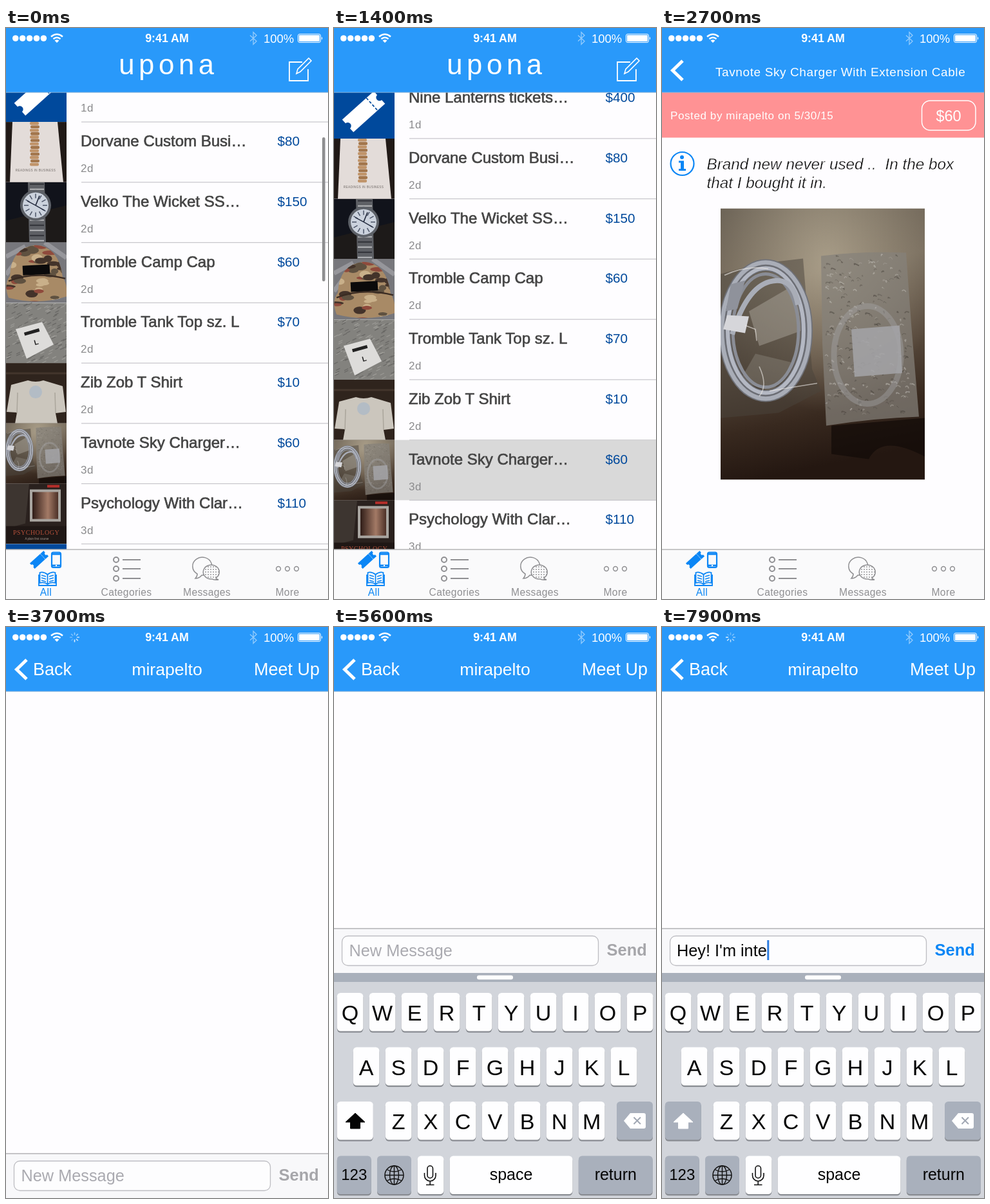
Animation of 500 by 888 pixels, one loop 8000 ms. Source, as an HTML page:

```html
<!DOCTYPE html>
<html lang="en">
<head>
<meta charset="utf-8">
<title>Marketplace app</title>
<style>
html, body { margin: 0; width: 100%; height: 100%; overflow: hidden; background: #fefdff; }
svg { display: block; width: 100vw; height: 100vh; }
text { font-family: "Liberation Sans", Arial, sans-serif; white-space: pre; }
.logo { font-family: "Liberation Mono", "Courier New", monospace; }
.serif { font-family: "Liberation Serif", serif; }
.medium { stroke: #444; stroke-width: .65; }
.light { font-style: italic; stroke: #fefdff; stroke-width: .5; }
</style>
</head>
<body>
<svg id="stage" viewBox="0 0 500 888" preserveAspectRatio="none"></svg>
<script>
const LOOP = 8000, ROW = 93.75, BLUE = '#2999fa', TINT = '#0b86f5', GREY = '#8f8f92';
const USER = 'mirapelto';

let seed = 7;
const rnd = (a = 0, b = 1) => {
  seed = (seed * 16807) % 2147483647;
  return +(a + (b - a) * seed / 2147483647).toFixed(2);
};
const many = (n, fn) => Array.from({ length: n }, (_, i) => fn(i)).join('');
const text = (x, y, size, fill, str, more = '') =>
  `<text x="${x}" y="${y}" font-size="${size}" fill="${fill}" ${more}>${str}</text>`;
const rect = (x, y, w, h, fill, more = '') =>
  `<rect x="${x}" y="${y}" width="${w}" height="${h}" fill="${fill}" ${more}/>`;
const circle = (x, y, r, fill, more = '') => `<circle cx="${x}" cy="${y}" r="${r}" fill="${fill}" ${more}/>`;
const oval = (x, y, rx, ry, more) => `<ellipse cx="${x}" cy="${y}" rx="${rx}" ry="${ry}" ${more}/>`;
const path = (d, more) => `<path d="${d}" ${more}/>`;
const line = (d, color, width, more = '') => path(d, `fill="none" stroke="${color}" stroke-width="${width}" ${more}`);
const group = (id, body, more = '') => `<g id="${id}" ${more}>${body}</g>`;
const MID = 'text-anchor="middle"', BOLD = 'font-weight="bold"';
const spaced = n => `letter-spacing="${n}"`;

const ticket = (x, y, scale, fill, gap) =>
  `<g transform="translate(${x} ${y}) rotate(-42) scale(${scale})">` +
  path('M-38-15H38V-6A6 6 0 0 0 38 6V15H-38V6A6 6 0 0 0-38-6Z', `fill="${fill}"`) +
  line('M20-15V15', gap, 2, 'stroke-dasharray="5 3"') + '</g>';

// Charger photo, 317 x 422
const strand = (rx, ry, color, w) => oval(70, 190, rx, ry, `fill="none" stroke="${color}" stroke-width="${w}"`);
const photo = () =>
  rect(0, 0, 317, 422, 'url(#table)') + rect(0, 0, 317, 422, 'url(#glow)') +
  path('M172 338L317 326V386Q250 350 230 390L172 382Z', 'fill="#120b08" opacity=".7"') +
  path('M0 102L60 86L128 78L142 250L156 284L90 318L0 326Z', 'fill="#4a443d" opacity=".5"') +
  path('M44 160L116 118L126 190L60 214Z', 'fill="#b9b4ab" opacity=".4"') +
  path('M54 226L112 240L80 286L30 268Z', 'fill="#8f897f" opacity=".4"') +
  strand(68, 106, '#6f7178', 10) + strand(68, 106, '#a9adb7', 6.5) +
  strand(59, 97, '#6a6c73', 9) + strand(59, 97, '#b4b8c3', 6) + strand(51, 88, '#8a8d96', 5) +
  line('M18 196Q40 124 76 114T120 150', '#a9adb7', 8) +
  path('M10 166L44 168L38 194L4 188Z', 'fill="#d6d6da"') +
  path('M16 118L38 112L26 156L8 160Z', 'fill="#8f929b"') +
  line('M38 182L54 188L56 206M6 104Q40 88 74 94M60 246Q74 276 60 292M76 284L150 272', '#eeece8', 1.6, 'opacity=".6"') +
  path('M156 74Q220 66 288 69L296 180L308 324Q240 326 164 338L158 210Z', 'fill="#85817a" opacity=".72"') +
  many(260, () => {
    const y = rnd(74, 322), x = rnd(160, 282 + (y - 70) * .08);
    return line(`M${x} ${y}q${rnd(-4, 4)}-4 ${rnd(1, 7)} ${rnd(-2, 2)}`, rnd() < .45 ? '#d4d1cb' : '#3f3a34',
      rnd(.8, 2), `opacity="${rnd(.2, .5)}"`);
  }) +
  oval(228, 228, 52, 76, 'fill="none" stroke="#a5a5a8" stroke-width="9" opacity=".4"') +
  path('M203 188L278 182L282 256L208 262Z', 'fill="#a5a5a8" opacity=".85"');

// Thumbnails, 94 x 94
const thumbs = {
  blank: () => rect(0, 0, 94, 94, '#00499c') + ticket(46, 52, .87, '#fff', '#00499c'),
  book: () => rect(0, 0, 94, 94, '#211a17') + path('M10 0H80L89 94H6Z', 'fill="#e3dcd9"') +
    many(13, i => rect(37 + i % 2, i * 5.3, 14, 4.7, i % 2 ? '#a3764c' : '#c0946a', 'rx="2"')) +
    text(46, 77, 4.6, '#6d6764', 'READINGS IN BUSINESS', `${MID} letter-spacing=".4"`),
  watch: () => rect(0, 0, 94, 94, '#11131b') + path('M0 60L94 36V94H0Z', 'fill="#1d1a19"') +
    path('M34 0H60L62 94H36Z', 'fill="#5e6065"') +
    many(12, i => line(`M37 ${i * 8 + 3}H59`, i % 2 ? '#b5b6b9' : '#303238', 2)) +
    circle(46, 36, 24, '#5d6168') + circle(46, 36, 20, '#cbd2dd') +
    many(12, i => line('M46 18V25', '#4b5467', 1.5, `transform="rotate(${i * 30} 46 36)"`)) +
    line('M46 36L33 29M46 36L60 44M46 36L52 21', '#252d40', 1.6),
  cap: () => rect(0, 0, 94, 94, '#77777c') + line('M0 22L30 6M60 0L94 24M0 50L12 34', '#96969b', 7) +
    `<g clip-path="url(#capShape)">` + rect(0, 0, 94, 94, '#a88a66') +
    many(40, i => oval(rnd(0, 94), rnd(0, 94), rnd(5, 13), rnd(2, 6),
      `fill="${['#43332a', '#8f4a3c', '#c9b08a', '#5f5140'][i % 4]}"`)) + '</g>' +
    line('M4 60Q44 44 92 56', '#3a2b22', 2.5) + rect(26, 35, 42, 15, '#0b0a0b', 'transform="rotate(-3 47 43)"'),
  tag: () => rect(0, 0, 94, 94, '#83827e') +
    many(150, () => line(`M${rnd(0, 94)} ${rnd(0, 94)}l6-3`, rnd() < .5 ? '#9c9b96' : '#686764', 1.2)) +
    path('M15 41L56 30L74 65L32 87Z', 'fill="#dddcda"') +
    rect(28, 43, 24, 5, '#222', 'transform="rotate(-16 40 45)"') +
    text(47, 65, 11, '#222', 'L', `${MID} ${BOLD} transform="rotate(-16 47 61)"`),
  shirt: () => rect(0, 0, 94, 94, '#2f241d') + line('M0 16H94', '#43352c', 3) +
    path('M8 34L34 27Q46 31 58 27L88 36L93 76L77 78L80 94H14L17 77L1 76Z', 'fill="#cbc6bd"') +
    line('M18 46L17 78M76 46L77 78', '#aaa59b', 1.5) + circle(46, 45, 10, '#b3bcc5'),
  charger: () => rect(0, 0, 94, 94, '#6f6557') +
    '<use href="#photo" transform="translate(0 -15) scale(.2975)"/>',
  text: () => rect(0, 0, 94, 94, '#2a211e') + path('M0 0H36L30 62L0 70Z', 'fill="#3d3530"') +
    rect(37, 9, 48, 50, '#a9a5a0') + rect(41, 13, 40, 42, 'url(#cover)') +
    rect(64, 2, 19, 4, '#b52e2a') + rect(0, 66, 94, 28, '#1f1715') +
    text(47, 79, 10, '#b5503a', 'PSYCHOLOGY', `${MID} class="serif" letter-spacing=".5"`) +
    text(48, 87, 4.5, '#a59a92', 'A plain first course', MID),
};

const items = [
  ['blank', 'Nine Lanterns tickets…', '$400', '1d'],
  ['book', 'Dorvane Custom Busi…', '$80', '2d'],
  ['watch', 'Velko The Wicket SS…', '$150', '2d'],
  ['cap', 'Tromble Camp Cap', '$60', '2d'],
  ['tag', 'Tromble Tank Top sz. L', '$70', '2d'],
  ['shirt', 'Zib Zob T Shirt', '$10', '2d'],
  ['charger', 'Tavnote Sky Charger…', '$60', '3d'],
  ['text', 'Psychology With Clar…', '$110', '3d'],
  ['blank', '', '', ''],
];

const row = ([thumb, title, price, age], i) =>
  `<g transform="translate(0 ${52.25 + i * ROW})">` +
  (thumb === 'charger' ? rect(94, 0, 406, ROW, '#d9d9d9', 'id="pressed"') : '') +
  `<g clip-path="url(#thumb)">${thumbs[thumb]()}</g>` +
  text(116, 38, 24, '#444', title, 'class="medium"') + text(421.5, 37, 20.7, '#00499c', price) +
  text(116, 78, 17, '#8a8a8c', age, spaced(.5)) +
  line(`M117 ${ROW}H500`, '#c8c7cc', 1.2) + '</g>';

const status =
  many(5, i => circle(14.8 + i * 10.9, 16, 4.8, '#fff')) +
  line('M70 13.5Q79 6 88 13.5M73.5 17Q79 12.5 84.5 17', '#fff', 2.6) + path('M75.5 19.5Q79 16.8 82.5 19.5L79 23Z', 'fill="#fff"') +
  group('spinner', many(8, i => line('M0-3.5V-7.5', '#fff', 1.5, `opacity="${.25 + i * .09}" transform="rotate(${i * 45})"`))) +
  text(250, 22, 17.8, '#fff', '9:41 AM', `${MID} ${BOLD}`) +
  line('M379 11.5L389 20.5L384 25.5V6.5L389 11.5L379 20.5', '#fff', 1.3, 'opacity=".5"') +
  text(400, 22.5, 18.4, '#fff', '100%') +
  rect(453.5, 9.5, 35, 13, 'none', 'rx="2.5" stroke="#fff"') + rect(455, 11, 32, 10, '#fff', 'rx="1"') +
  path('M490 13.5Q492.5 16 490 18.5Z', 'fill="#fff"');

const nav = rect(0, 0, 500, 100, BLUE) + line('M0 100.2H500', '#8db4d8', 1) +
  group('navList', text(174, 72, 44, '#fff', 'upona', 'class="logo" letter-spacing="4.6"') +
    line('M460 53H440V82H469V64', '#fff', 1.8) + line('M451 71L453 64L470 47L474 51L457 68Z', '#fff', 1.6)) +
  line('M32 51L16.5 66L32 81', '#fff', 5, 'id="chevron"') +
  group('navDetail', text(83, 75, 19, '#fff', 'Tavnote Sky Charger With Extension Cable', spaced(.6))) +
  group('navChat', text(42, 75, 27, '#fff', 'Back') + text(250, 75, 26.6, '#fff', USER, MID) +
    text(385, 75, 27, '#fff', 'Meet Up')) + status;

const tabLabel = (x, str, fill) => text(x, 882.5, 15.6, fill, str, `${MID} letter-spacing=".35"`);
const tabs = rect(0, 811, 500, 77, '#fafafb') + line('M0 811H500', '#b4b4b6', 1.4) +
  ticket(51.5, 827, .38, TINT, '#fafafb') +
  rect(71, 815.5, 14, 23.5, 'none', `rx="2.5" stroke="${TINT}" stroke-width="2.2"`) +
  line('M71 818H85M71 836H85', TINT, 3) + circle(78, 836, 1.2, '#fafafb') +
  line('M64.5 850Q58 845 52.5 847V863Q59 861 64.5 865Q70 861 76.5 863V847Q71 845 64.5 850V865M51 850V867H78V850', TINT, 1.8) +
  line('M55 851L62 853M55 855L62 857M55 859L62 861M74 851L67 853M74 855L67 857M74 859L67 861', TINT, 1.8) +
  [827, 841, 856].map(y => circle(171, y, 4, 'none', `stroke="${GREY}" stroke-width="2"`) + line(`M181 ${y}H209`, GREY, 2)).join('') +
  path('M297 849A15 14 0 1 1 304 851Q300 856 294 856Q297 853 297 849Z', `fill="#fafafb" stroke="${GREY}" stroke-width="1.5"`) +
  path('M326 855A12.5 11 0 1 0 320 857Q325 859 330 858Q326 857 326 855Z', `fill="url(#dots)" stroke="${GREY}" stroke-width="1.5"`) +
  [423, 437, 451].map(x => circle(x, 841, 3.4, 'none', `stroke="${GREY}" stroke-width="1.5"`)).join('') +
  tabLabel(62, 'All', TINT) + tabLabel(187, 'Categories', GREY) + tabLabel(312, 'Messages', GREY) + tabLabel(437, 'More', GREY);

const detail = rect(0, 100, 500, 788, '#fefdff') + rect(0, 100, 500, 70.5, '#ff9294') +
  text(13, 141.5, 17, '#fff', `Posted by ${USER} on 5/30/15`, spaced(.6)) +
  rect(403.5, 113, 83.5, 46, 'none', 'rx="13" stroke="#fff" stroke-width="1.5"') +
  text(445, 145, 23.5, '#fff', '$60', MID) +
  circle(31.5, 211, 18, 'none', `stroke="${TINT}" stroke-width="2.2"`) + circle(31, 201, 3, TINT) +
  path('M26 206.5H34V219H37V222H26V219H29V209.5H26Z', `fill="${TINT}"`) +
  text(69.5, 220, 24.3, '#050505', 'Brand new never used ..  In the box', 'class="light"') +
  text(69.5, 249, 24.3, '#050505', 'that I bought it in.', 'class="light"') +
  '<use href="#photo" transform="translate(91 280.5)" clip-path="url(#frame)"/>';

const key = (x, y, w, label = '', dark = false, size = 34) =>
  rect(x, y + 1.8, w, 60, '#898c92', 'rx="5.5"') + rect(x, y, w, 59.5, dark ? '#a9b0bc' : '#fefeff', 'rx="5.5"') +
  text(x + w / 2, y + (size > 30 ? 43 : 37), size, '#050505', label, MID);
const keyRow = (letters, x, y) => [...letters].map((c, i) => key(x + i * 50, y, 40.5, c)).join('');
const arrow = fill => path('M33 756L48 770H40.5V780H25.5V770H18Z', `fill="${fill}" stroke="${fill}" stroke-linejoin="round"`);

const keyboard = rect(0, 538, 500, 14, '#a9b0bb') + rect(222, 541.8, 56, 6.4, '#fff', 'rx="3.2"') +
  rect(0, 552, 500, 340, '#d2d5db') +
  keyRow('QWERTYUIOP', 4.8, 569) + keyRow('ASDFGHJKL', 29.8, 653.5) + keyRow('ZXCVBNM', 79.8, 738) +
  group('shiftOn', key(4.8, 738, 56) + arrow('#050505')) + group('shiftOff', key(4.8, 738, 56, '', true) + arrow('#fff')) +
  key(439, 738, 56, '', true) + path('M450 768L460 756H481Q484 756 484 759V777Q484 780 481 780H460Z', 'fill="#fff"') +
  line('M465.5 762.5L476 773M476 762.5L465.5 773', '#a0a7b3', 2) +
  key(4.8, 822.5, 53, '123', true, 24) + key(67, 822.5, 53, '', true) +
  line('M79 852.5H108M93.5 838V867M82.5 844Q93.5 850 104.5 844M82.5 861Q93.5 855 104.5 861', '#111', 1.4) +
  circle(93.5, 852.5, 14.5, 'none', 'stroke="#111" stroke-width="1.5"') +
  oval(93.5, 852.5, 7, 14.5, 'fill="none" stroke="#111" stroke-width="1.4"') +
  key(129.8, 822.5, 40.5) + rect(145, 838, 8.5, 19, 'none', 'rx="4.2" stroke="#111" stroke-width="1.6"') +
  line('M140.5 849V853A8.7 8.7 0 0 0 158 853V849M149.2 862V867M143 867.5H155.5', '#111', 1.6) +
  key(179.8, 822.5, 190.5, 'space', false, 25) + key(379.8, 822.5, 115, 'return', true, 25);

const chat = rect(0, 100, 500, 788, '#fefdff') +
  group('composer', rect(0, 469, 500, 69, '#f8f8fa') + line('M0 469H500', '#b2b2b5', 1.4) +
    rect(12.5, 480.5, 398, 46, '#fdfdfe', 'rx="9" stroke="#bdbdc2" stroke-width="1.3"') +
    text(23.5, 512, 25.3, '#aaaab0', 'New Message', 'id="hint"') + text(23, 512, 25.3, '#050505', '', 'id="draft"') +
    rect(0, 487, 3, 31, '#2d7de0', 'id="caret"') +
    text(423.5, 511, 25.5, '#a6a6aa', 'Send', `${BOLD} id="send"`) + keyboard);

const stop = (at, color, opacity = 1) => `<stop offset="${at}" stop-color="${color}" stop-opacity="${opacity}"/>`;
const clip = (id, body) => `<clipPath id="${id}">${body}</clipPath>`;
const stage = document.getElementById('stage');
stage.innerHTML = '<defs>' +
  `<linearGradient id="table" x2=".15" y2="1">${stop(0, '#6d6457') + stop(.3, '#776c5d') + stop(.6, '#57493c') + stop(.82, '#38291f') + stop(1, '#241711')}</linearGradient>` +
  `<radialGradient id="glow" cx=".52" cy=".2" r=".55">${stop(0, '#c9bda4', .6) + stop(1, '#c9bda4', 0)}</radialGradient>` +
  `<linearGradient id="cover">${stop(0, '#2f1c17') + stop(.6, '#a37a66') + stop(1, '#4c3027')}</linearGradient>` +
  `<pattern id="dots" width="4" height="4" patternUnits="userSpaceOnUse">${rect(0, 0, 4, 4, '#fafafb') + circle(2, 2, .9, GREY)}</pattern>` +
  clip('thumb', rect(0, 0, 94, ROW)) + clip('frame', rect(0, 0, 317, 422)) + clip('content', rect(0, 100, 500, 711)) +
  clip('capShape', path('M6 52Q8 8 46 4Q82 6 88 54Q96 66 94 84Q52 98 4 86Q-4 66 6 52Z', '')) +
  group('photo', photo()) + '</defs>' + rect(0, 0, 500, 888, '#fefdff') +
  group('listPage', `<g clip-path="url(#content)">${group('rows', items.map(row).join('')) +
    rect(491, 170, 4.6, 224, '#8e8e90', 'rx="2.3" id="scrollbar"')}</g>`) +
  group('detailPage', detail) + group('tabs', tabs) + group('chatPage', chat) + nav;

const el = {};
stage.querySelectorAll('[id]').forEach(node => el[node.id] = node);

const clamp = x => Math.min(1, Math.max(0, x));
const easeOut = (t, start, length) => 1 - (1 - clamp((t - start) / length)) ** 3;
const move = (node, x, y = 0) => node.setAttribute('transform', `translate(${x.toFixed(2)} ${y.toFixed(2)})`);
const fade = (node, opacity) => {
  node.setAttribute('opacity', opacity.toFixed(3));
  node.style.display = opacity > 0 ? '' : 'none';
};
const show = (node, visible) => fade(node, visible ? 1 : 0);

// [time, draft]; the contraction is autocorrected when the space is typed
const typing = [[0, ''], [5800, 'H'], [5950, 'He'], [6100, 'Hey'], [6400, 'Hey!'], [6600, 'Hey! '], [6850, 'Hey! I'],
  [7080, 'Hey! Im'], [7250, "Hey! I'm "], [7400, "Hey! I'm i"], [7550, "Hey! I'm in"], [7700, "Hey! I'm int"], [7850, "Hey! I'm inte"]];

function render(t) {
  const scroll = 26 * (1 - Math.exp(-t / 260));
  const open = easeOut(t, 1500, 450), talk = easeOut(t, 3050, 450), raise = easeOut(t, 4800, 350);

  move(el.rows, 0, scroll);
  move(el.scrollbar, 0, -scroll / 3);
  fade(el.scrollbar, 1 - clamp((t - 850) / 300));
  show(el.pressed, t >= 1300);
  move(el.listPage, -150 * open);
  show(el.listPage, open < 1);
  move(el.detailPage, 500 * (1 - open) - 150 * talk);
  show(el.detailPage, open > 0 && talk < 1);
  move(el.tabs, -150 * talk);
  show(el.tabs, talk < 1);
  move(el.chatPage, 500 * (1 - talk));
  show(el.chatPage, talk > 0);

  fade(el.navList, 1 - open);
  move(el.navList, -100 * open);
  fade(el.chevron, open);
  fade(el.navDetail, open * (1 - talk));
  move(el.navDetail, 200 * (1 - open) - 150 * talk);
  fade(el.navChat, talk);
  move(el.navChat, 200 * (1 - talk));

  const busy = (t >= 3300 && t < 4200) || t >= 7500;
  show(el.spinner, busy);
  el.spinner.setAttribute('transform', `translate(106.5 16) rotate(${Math.floor(t / 100) * 45})`);

  move(el.composer, 0, 350 * (1 - raise));
  const [when, draft] = typing.findLast(([at]) => t >= at);
  el.draft.textContent = draft;
  show(el.hint, !draft);
  el.send.setAttribute('fill', draft ? TINT : '#a6a6aa');
  const capital = draft === '' || draft === 'Hey! ';
  show(el.shiftOn, capital);
  show(el.shiftOff, !capital);
  show(el.caret, draft ? t - when < 500 : raise === 1 && (t - 5050) % 1000 < 500);
  el.caret.setAttribute('x', (23.5 + (draft ? el.draft.getComputedTextLength() : 0)).toFixed(2));
}

const begin = performance.now();
function tick() {
  render((performance.now() - begin) % LOOP);
  requestAnimationFrame(tick);
}
tick();
</script>
</body>
</html>
```
